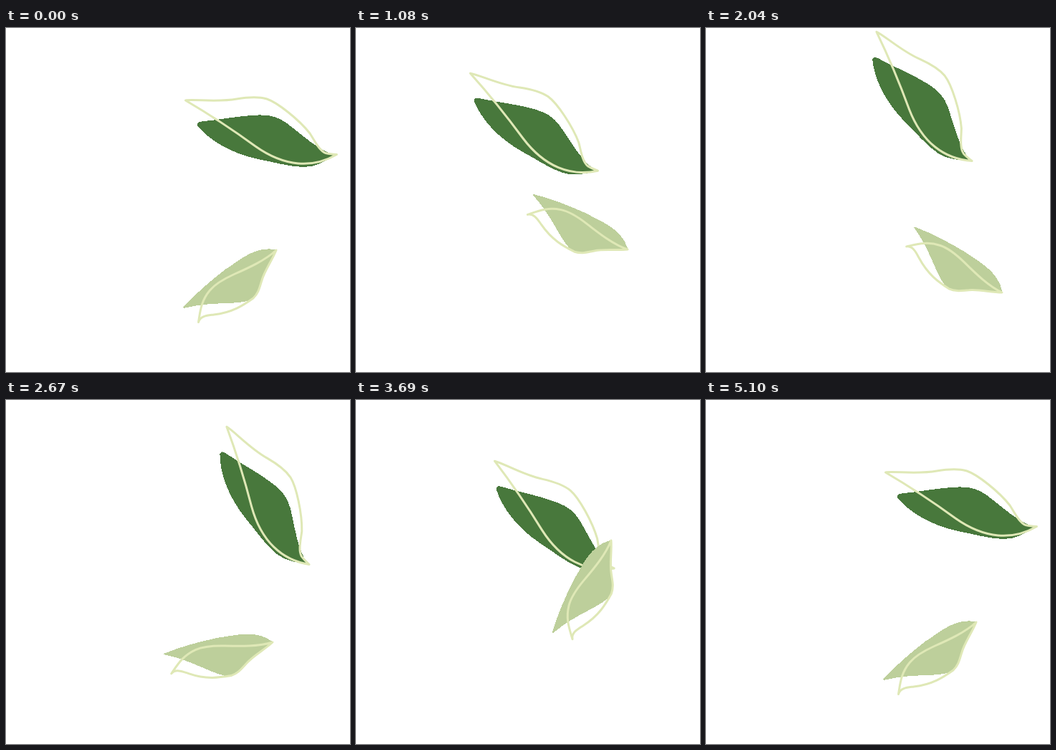
These frames come from a looping animation (480x480 px, 5130 ms). An HTML page:

```html
<!DOCTYPE html>
<html lang="en">
<head>
<meta charset="utf-8">
<title>Drifting leaves</title>
<style>
  html, body { margin: 0; width: 100%; height: 100%; overflow: hidden; background: #fff; }
  svg { display: block; width: 100vw; height: 100vh; }
  .blade { shape-rendering: crispEdges; }
  .line { fill: none; stroke: #dfe8b6; stroke-width: 3; stroke-linejoin: round; }
</style>
</head>
<body>
<svg viewBox="0 0 480 480">
  <g id="dark">
    <path class="blade" fill="#48783c" d="M267 134Q267 131 273 130.5C300 128 327 122 352 121.5C368 121 380 124 392 133C412 148 438 173 461 177.5C446 185 433 194 416 194C396 194 374 187 352 183C314 175 284 157 267 136Z"/>
    <path class="line" d="M250.5 101C262 99 295 104 322 99C340 96 352 95.5 364 99C379 104 409 128 424 147C431 158 437 171 446 174.5Q452 176 461.5 176.5C428 196 389 194 348 165Q300 130 250.5 101Z"/>
  </g>
  <g id="light">
    <path class="blade" fill="#bdcf9b" d="M247 390C264 371 284 354 306.5 336.5C324 326 347 303 377 309.5C371 324 362 339 357 354C354 364 353 372 345 378C325 388 290 380 248 391Z"/>
    <path class="line" d="M377 310C362 324 339 334.5 318.5 343.5C302 351 292 357 284.5 366C272 381 271 395 268.5 410.5C271 401 283 401 290 400C316 397 331 387 345 377C353 369 354 361 357 352C361 338 371 325 377 310Z"/>
  </g>
</svg>
<script>
const LOOP = 5130, STEP = 30, PERIOD = LOOP - STEP;

// Key points: ms, x, y of the leaf's pivot; the light leaf adds its angle.
const darkPath = [
  [0, 250, 101], [540, 218, 98], [1080, 159, 63], [1440, 147, 22], [2040, 237.5, 5], [2670, 307.5, 37],
  [3240, 242, 80], [3690, 193, 85], [4080, 137, 39], [4530, 180, 37], [4860, 225, 64.5]
];
const lightPath = [
  [0, 377, 310, 0], [540, 345, 327, 32], [1080, 379, 309, 62], [1620, 396, 374, 72], [2040, 413, 369, 68.5],
  [2670, 372, 338, 25.6], [3000, 334, 300, 6], [3690, 356, 196, -25.8], [4320, 394, 251, -15], [4530, 392, 275, -9.3]
];

// The dark leaf swings up and back at a constant rate, resting briefly at the ends of the loop.
const darkAngle = t => Math.max(0, 41.9 - 0.0168 * Math.abs(t - 2520));

// Closed smooth curve through the keys; c picks the column.
function curve(keys, t, c) {
  const n = keys.length;
  const key = i => {
    const k = keys[(i + n) % n];
    return { t: k[0] + Math.floor(i / n) * PERIOD, v: k[c] };
  };
  const slope = i => {
    const a = key(i - 1), b = key(i + 1);
    return (b.v - a.v) / (b.t - a.t);
  };
  let i = n - 1;
  while (keys[i][0] > t) i--;
  const a = key(i), b = key(i + 1), d = b.t - a.t, u = (t - a.t) / d, w = 1 - u;
  return a.v * w * w * (1 + 2 * u) + b.v * u * u * (3 - 2 * u)
       + d * u * w * (slope(i) * w - slope(i + 1) * u);
}

function place(id, path, t, angle) {
  const [, px, py] = path[0];
  const x = curve(path, t, 1), y = curve(path, t, 2);
  document.getElementById(id).setAttribute('transform',
    `translate(${x} ${y}) rotate(${angle}) translate(${-px} ${-py})`);
}

const start = performance.now();
function tick() {
  const now = (performance.now() - start) % LOOP;
  const t = Math.floor(now / STEP) * STEP % PERIOD;
  place('dark', darkPath, t, darkAngle(t));
  place('light', lightPath, t, curve(lightPath, t, 3));
  requestAnimationFrame(tick);
}
tick();
</script>
</body>
</html>
```
